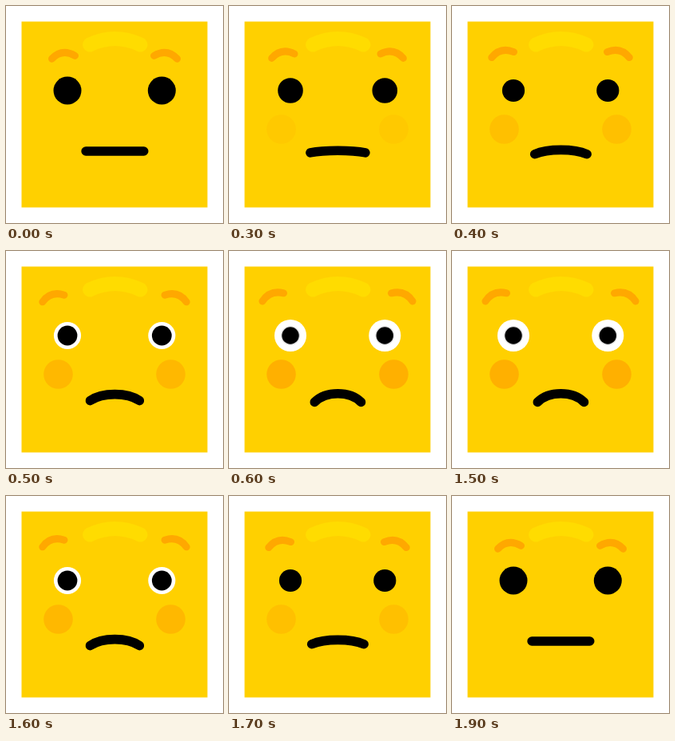
Write an HTML page with a canvas that moves like this. It is 272 by 272 pixels and loops after 2600 ms.

```html
<!DOCTYPE html>
<html lang="en">
<head>
<meta charset="utf-8">
<title>Worried face</title>
<style>
  html, body { margin: 0; width: 100%; height: 100%; overflow: hidden; background: #fff; }
  canvas { display: block; width: 100vw; height: 100vh; }
</style>
</head>
<body>
<canvas id="stage"></canvas>
<script>
const SIZE = 272, LOOP = 2600;
const canvas = document.getElementById('stage');
const ctx = canvas.getContext('2d');
const ratio = window.devicePixelRatio || 1;
canvas.width = canvas.height = Math.round(SIZE * ratio);
ctx.scale(canvas.width / SIZE, canvas.height / SIZE);
ctx.lineCap = 'round';

const mix = (a, b, p) => a + (b - a) * p;
const clamp = v => Math.min(5, Math.max(0, v));

// Worry level from 0 to 1, moving in five even 100 ms steps each way.
function worryAt(t) {
  const up = clamp(Math.floor((t - 200) / 100));
  const down = clamp(Math.floor((t - 1400) / 100));
  return (up - down) / 5;
}

function disc(x, y, r, color) {
  ctx.fillStyle = color;
  ctx.beginPath();
  ctx.arc(x, y, r, 0, Math.PI * 2);
  ctx.fill();
}

// Strokes a Bezier curve; four numbers after the start are quadratic, six are cubic.
function curve(color, width, x, y, ...rest) {
  ctx.strokeStyle = color;
  ctx.lineWidth = width;
  ctx.beginPath();
  ctx.moveTo(x, y);
  if (rest.length === 4) ctx.quadraticCurveTo(...rest);
  else ctx.bezierCurveTo(...rest);
  ctx.stroke();
}

function drawEye(x, p) {
  const y = 106;
  if (p > 0.5) disc(x, y, mix(8.2, 23, p), '#fff');
  if (p > 0.7) disc(x, y, 15 * p, '#e1e1e1');
  disc(x, y, mix(17.5, 9, p), '#000');
}

function drawCheek(x, p) {
  ctx.globalAlpha = p;
  disc(x, 154.5, 18.3, '#ffa900');
  ctx.globalAlpha = 1;
}

function drawBrow(p) {
  curve('#ffa800', 9,
    mix(57.5, 38, p), mix(66.2, 62.2, p),
    mix(70, 47, p), mix(53, 47.5, p),
    mix(86.5, 64, p), mix(62.3, 50.5, p));
}

function drawMouth(p) {
  const endY = mix(182, 191.3, p), bendY = mix(182, 173.6, p);
  const end = mix(36.3, 27.3, p), bend = mix(18, 14, p), mid = 136.4;
  curve('#000', 11.6, mid - end, endY,
    mid - bend, bendY, mid + bend, bendY, mid + end, endY);
}

function draw(p) {
  ctx.fillStyle = '#fff';
  ctx.fillRect(0, 0, SIZE, SIZE);
  ctx.fillStyle = '#ffd000';
  ctx.fillRect(19.5, 19.5, 233, 233);

  curve('#ffdc00', 18, 105, 48.5, 136.5, 33.5, 168.5, 48.5);
  drawCheek(65.5, p);
  drawCheek(206.5, p);
  drawEye(77, p);
  drawEye(195.3, p);

  drawBrow(p);
  ctx.save();
  ctx.translate(SIZE, 0);
  ctx.scale(-1, 1);
  drawBrow(p);
  ctx.restore();

  drawMouth(p);
}

const start = performance.now();
function tick() {
  draw(worryAt((performance.now() - start) % LOOP));
  requestAnimationFrame(tick);
}
tick();
</script>
</body>
</html>
```
